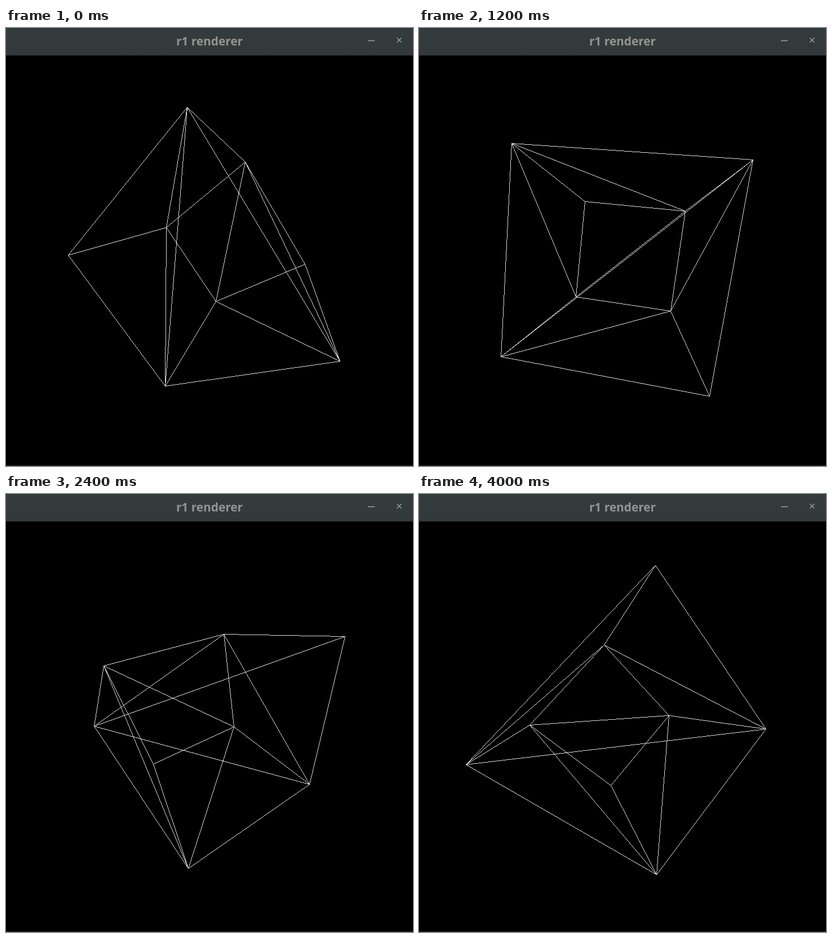
Recreate the animation shown at these times as an HTML page with a canvas. Size 722 by 776 pixels, loop 4.05 s.

```html
<!DOCTYPE html>
<html lang="en">
<head>
<meta charset="utf-8">
<title>r1 renderer</title>
<style>
  html, body { margin: 0; width: 100%; height: 100%; overflow: hidden; background: #000; }
  #bar {
    position: absolute; left: 0; top: 0; width: 722px; height: 48px;
    background: linear-gradient(#343b3d, #32393b);
    border-bottom: 1px solid #1f2325;
    color: #92958f;
    font: bold 20.85px/46px "Open Sans", "Noto Sans", sans-serif;
    text-align: center; white-space: nowrap;
  }
  #bar svg { position: absolute; left: 0; top: 0; }
  #view { position: absolute; left: 0; top: 49px; }
  #edge { position: absolute; left: 0; top: 774px; width: 722px; height: 2px; background: #20171b; }
</style>
</head>
<body>
<canvas id="view" width="722" height="725"></canvas>
<div id="bar">r1 renderer
  <svg width="722" height="48" fill="none" stroke="#a0a39f" stroke-width="1.3">
    <path d="M642 22.5H654M693.5 17.5L701.5 25.5M701.5 17.5L693.5 25.5"/>
  </svg>
</div>
<div id="edge"></div>
<script>
const STEP = 50, STEPS = 81;
const CENTRE_X = 361, CENTRE_Y = 363, FOCAL = 304, DISTANCE = 2.5;

// [step, turn]: the turn in degrees drives all three axes
const TURNS = [[0, -70.8], [15, -20.3], [33, 37], [48, 86.85], [56, 115], [68, 154.5], [80, 193.9]];

const ctx = document.getElementById("view").getContext("2d");

const corners = [];
for (const x of [-1, 1]) for (const y of [-1, 1]) for (const z of [-1, 1]) corners.push([x, y, z]);

// The two poles carry no face diagonal
const isPole = ([x, y, z]) => x === y && y === -z;

const edges = [];
corners.forEach((a, i) => corners.slice(0, i).forEach((b, j) => {
  const apart = a.filter((v, k) => v !== b[k]).length;
  if (apart === 1 || (apart === 2 && !isPole(a) && !isPole(b))) edges.push([i, j]);
}));

function turnAt(step) {
  const k = Math.max(1, TURNS.findIndex(([s]) => s >= step));
  const [s0, t0] = TURNS[k - 1], [s1, t1] = TURNS[k];
  return t0 + (t1 - t0) * (step - s0) / (s1 - s0);
}

function spin(u, v, angle) {
  const c = Math.cos(angle), s = Math.sin(angle);
  return [u * c - v * s, u * s + v * c];
}

function project([x, y, z], turn) {
  const rad = turn * Math.PI / 180;
  [x, y] = spin(x, y, 0.8 * rad);
  [z, x] = spin(z, x, 0.7 * rad);
  [y, z] = spin(y, z, 0.6 * rad);
  const scale = FOCAL / (DISTANCE + z);
  return [Math.round(CENTRE_X + x * scale), Math.round(CENTRE_Y + y * scale)];
}

// Hard one-pixel line without smoothing
function line([x0, y0], [x1, y1]) {
  const n = Math.max(Math.abs(x1 - x0), Math.abs(y1 - y0), 1);
  for (let i = 0; i <= n; i++) {
    ctx.fillRect(Math.round(x0 + (x1 - x0) * i / n), Math.round(y0 + (y1 - y0) * i / n), 1, 1);
  }
}

function draw(step) {
  ctx.fillStyle = "#000";
  ctx.fillRect(0, 0, 722, 725);
  ctx.fillStyle = "#d8d8d8";
  const turn = turnAt(step);
  const points = corners.map(c => project(c, turn));
  for (const [i, j] of edges) line(points[i], points[j]);
}

const start = performance.now();
let shown = -1;
function tick() {
  const step = Math.floor((performance.now() - start) / STEP) % STEPS;
  if (step !== shown) draw(shown = step);
  requestAnimationFrame(tick);
}
tick();
</script>
</body>
</html>
```
